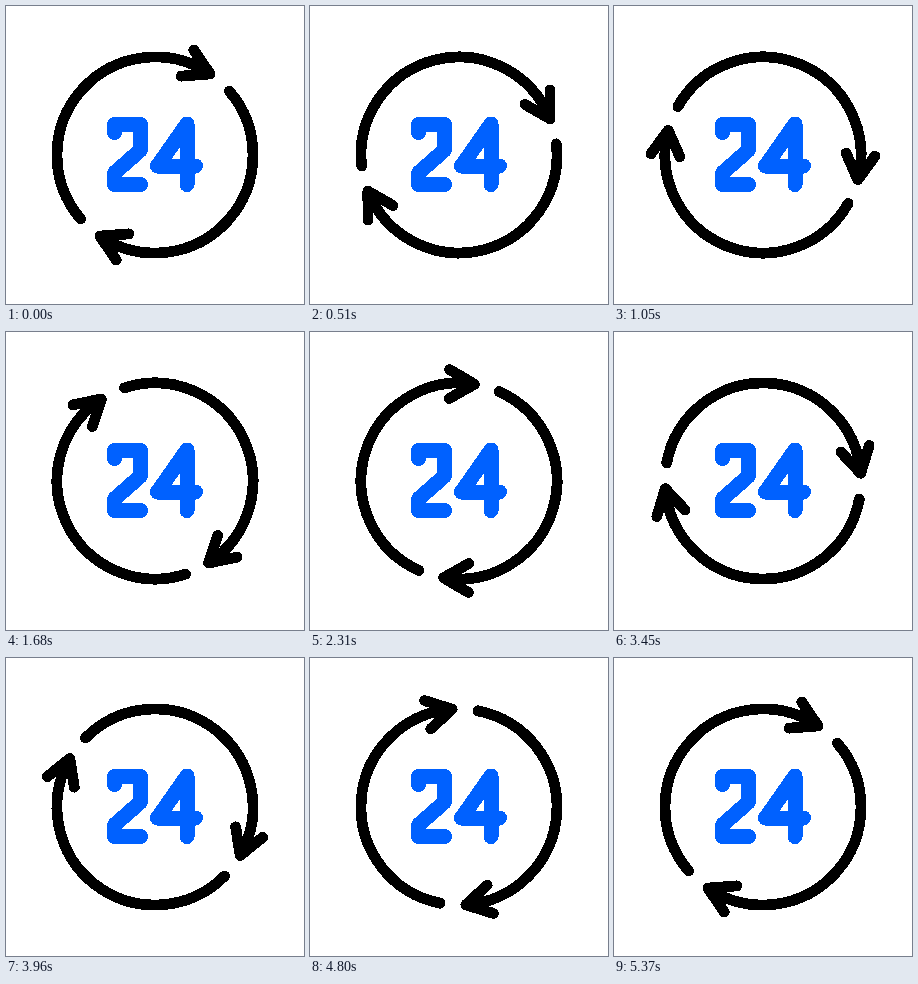
An HTML page for the animation above (5400 ms loop, 298 by 298 pixels).

```html
<!DOCTYPE html>
<html lang="en">
<head>
<meta charset="utf-8">
<title>24 hours</title>
<style>
  html, body { margin: 0; width: 100%; height: 100%; overflow: hidden; background: #fff; }
  svg { display: block; width: 100vw; height: 100vh; }
  path { fill: none; stroke-linecap: round; stroke-linejoin: round; shape-rendering: crispEdges; }
  #ring { stroke: #000; stroke-width: 10.8; }
  #digits { stroke: #0061ff; stroke-width: 15; }
</style>
</head>
<body>
<svg viewBox="0 0 298 298">
  <g id="ring"></g>
  <g id="digits">
    <path d="M108.5 126.5V118.5H134.5V144L108.5 167V178.5H134.5"/>
    <path d="M189.5 160H151.5L181 118V178.5"/>
  </g>
</svg>
<script>
const CENTER = 149, RADIUS = 98;
const TIP = 34.2, TAIL = 229.3;            // degrees clockwise from the top
const BARB = { length: 29, lean: 8.5, spread: 30 };
const LOOP = 5400, STEP = 30, LAST = LOOP / STEP - 1;

const rad = deg => deg * Math.PI / 180;
const onRing = deg => [CENTER + RADIUS * Math.sin(rad(deg)), CENTER - RADIUS * Math.cos(rad(deg))];
const tip = onRing(TIP);

function barb(side) {
  const a = rad(TIP + 180 - BARB.lean + side * BARB.spread);
  return [tip[0] + BARB.length * Math.cos(a), tip[1] + BARB.length * Math.sin(a)];
}

const arrow = `M${onRing(TAIL)}A${RADIUS} ${RADIUS} 0 0 1 ${tip}M${barb(-1)}L${tip}L${barb(1)}`;
const ring = document.getElementById("ring");
ring.innerHTML = [0, 180]
  .map(turn => `<path d="${arrow}" transform="rotate(${turn} ${CENTER} ${CENTER})"/>`)
  .join("");

// One full turn, with the first and last steps in the same pose.
function draw(now) {
  const step = Math.floor((now % LOOP) / STEP);
  ring.setAttribute("transform", `rotate(${step * 360 / LAST} ${CENTER} ${CENTER})`);
}

const start = performance.now();
function tick() {
  draw(performance.now() - start);
  requestAnimationFrame(tick);
}
draw(0);
requestAnimationFrame(tick);
</script>
</body>
</html>
```
